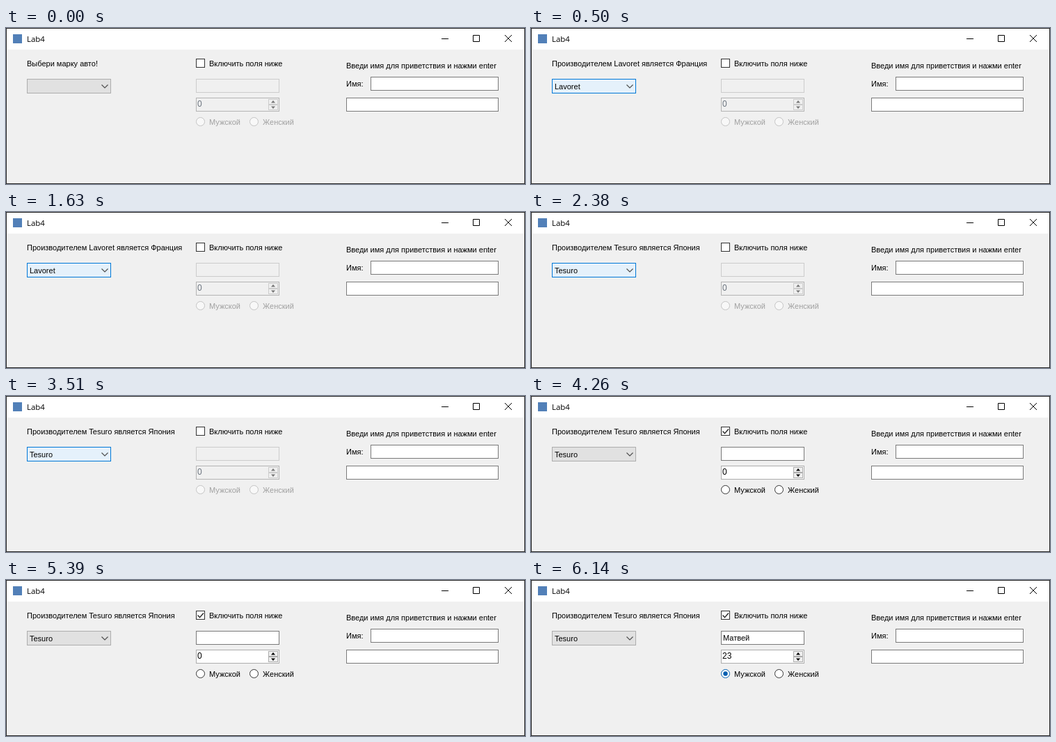
An HTML page for the animation above (8 s loop, 746 px wide and 224 px high).

```html
<!DOCTYPE html>
<html lang="ru">
<head>
<meta charset="utf-8">
<title>Lab4</title>
<style>
html, body { margin: 0; width: 100%; height: 100%; overflow: hidden; }
svg { display: block; }
text { font: 11px "Liberation Sans", Arial, sans-serif; white-space: pre; }
.title { font: 11.4px "Open Sans", "Noto Sans", sans-serif; }
.num { font-size: 12px; }
rect { shape-rendering: crispEdges; }
.icon { fill: none; stroke: #000; }
.box { fill: #fff; stroke: #7a7a7a; }
.check { fill: #fff; stroke: #333; }
.combo rect { fill: #e1e1e1; stroke: #adadad; }
.combo path { fill: none; stroke: #505050; stroke-width: 1.2; }
.combo.focus rect { fill: #e5f1fb; stroke: #0078d7; }
.spin { fill: #f0f0f0; stroke: #acacac; }
.edge { stroke: #adadad; }
circle { fill: #fff; stroke: #333; }
.chosen circle { stroke: #005fb0; }
.chosen .dot { fill: #005fb0; stroke: none; }
.dot { display: none; }
.chosen .dot { display: inline; }
.off .box { fill: #f0f0f0; stroke: #ccc; }
.off .edge { stroke: #b4b4b4; }
.off .spin { stroke: #ccc; }
.off .arrow { fill: #777; }
.off circle { fill: #f8f8f8; stroke: #c4c4c4; }
.off text { fill: #a0a0a0; }
.off .num { fill: #6d7680; }
</style>
</head>
<body>
<svg width="746" height="224" viewBox="0 0 746 224">
  <rect width="746" height="224" fill="#f0f0f0"/>
  <rect width="746" height="31" fill="#fff"/>
  <rect x=".5" y=".5" width="745" height="223" fill="none" stroke="#262626"/>

  <rect x="10" y="9" width="13" height="13" fill="#5280b8"/>
  <text class="title" x="30" y="20">Lab4</text>
  <path class="icon" d="M626 15.5h10M671.5 10.5h9v9h-9zM717 10l10 10M727 10l-10 10"/>

  <text id="label" x="30" y="55"></text>
  <g id="combo" class="combo">
    <rect x="30.5" y="73.5" width="120" height="20"/>
    <path d="M137.5 81.5l4.5 4.5 4.5-4.5"/>
    <text id="car" x="34" y="88"></text>
  </g>

  <rect class="check" x="273.5" y="44.5" width="12" height="12"/>
  <path id="tick" d="M275.5 50.5l3 3.2 5.5-6.2" fill="none" stroke="#222" stroke-width="1.3"/>
  <text x="292" y="55">Включить поля ниже</text>

  <g id="fields">
    <rect class="box" x="273.5" y="73.5" width="119" height="19"/>
    <text id="name" x="276" y="87"></text>
    <rect class="box edge" x="273.5" y="100.5" width="119" height="19"/>
    <text id="age" class="num" x="275" y="113"></text>
    <rect class="spin" x="377.5" y="102.5" width="13" height="7"/>
    <rect class="spin" x="377.5" y="110.5" width="13" height="7"/>
    <path class="arrow" d="M381 107.5h6l-3-3.5zM381 112.5h6l-3 3.5z"/>
    <g id="male">
      <circle cx="279.5" cy="134.5" r="6"/>
      <circle class="dot" cx="279.5" cy="134.5" r="3.2"/>
      <text x="292" y="139">Мужской</text>
    </g>
    <circle cx="356.5" cy="134.5" r="6"/>
    <text x="369" y="139">Женский</text>
  </g>

  <text x="489" y="58">Введи имя для приветствия и нажми enter</text>
  <text x="489" y="84">Имя:</text>
  <rect class="box" x="524.5" y="70.5" width="183" height="19"/>
  <rect class="box" x="489.5" y="100.5" width="218" height="19"/>
</svg>
<script>
const $ = id => document.getElementById(id);
const LOOP = 8000;
const made = (car, land) => `Производителем ${car} является ${land}`;
const blank = { label: "Выбери марку авто!", car: "", name: "", age: "0" };
const french = { ...blank, car: "Lavoret", label: made("Lavoret", "Франция"), focus: true };
const japanese = { ...french, car: "Tesuro", label: made("Tesuro", "Япония") };
const enabled = { ...japanese, focus: false, on: true };
const filled = { ...enabled, name: "Матвей", age: "23", male: true };
const steps = [[0, blank], [500, french], [2380, japanese], [4260, enabled], [6140, filled]];

function show(state) {
  for (const id of ["label", "car", "name", "age"]) $(id).textContent = state[id];
  $("combo").classList.toggle("focus", !!state.focus);
  $("fields").classList.toggle("off", !state.on);
  $("male").classList.toggle("chosen", !!state.male);
  $("tick").style.display = state.on ? "" : "none";
}

let current;
function tick() {
  const t = performance.now() % LOOP;
  const state = steps.findLast(([start]) => start <= t)[1];
  if (state !== current) show(current = state);
  requestAnimationFrame(tick);
}
tick();
</script>
</body>
</html>
```
